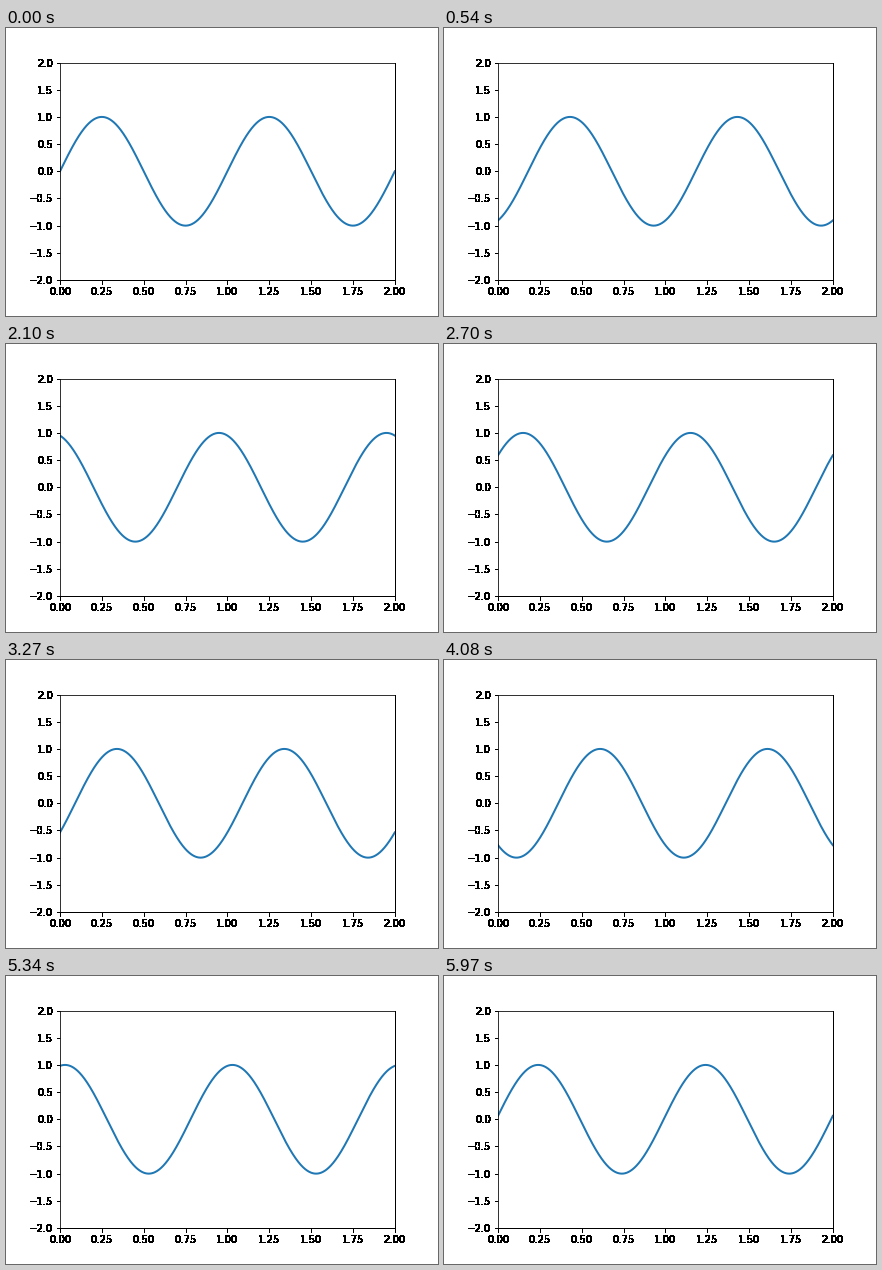
A matplotlib script that plays this animation: 432 by 288 pixels, repeating every 6 s.

```python
import numpy as np
import matplotlib.pyplot as plt
from matplotlib.animation import FuncAnimation

FRAMES = 200
INTERVAL = 30

fig, ax = plt.subplots(figsize=(6, 4), dpi=72, facecolor=(1, 1, 1, 0))
fig.subplots_adjust(left=0.125, right=0.9, bottom=0.125, top=0.88)
ax.set_xlim(0, 2)
ax.set_ylim(-2, 2)

# Dropping the alpha of a transparent render gives labels and ticks hard, heavy edges.
fig.canvas.draw()
backdrop = np.array(fig.canvas.buffer_rgba())[..., :3].copy()
fig.set_facecolor("white")
fig.figimage(backdrop, origin="upper", zorder=-1)

x = np.linspace(0, 2, 1000)
line, = ax.plot(x, np.sin(2 * np.pi * x), lw=2)


def update(i):
    line.set_ydata(np.sin(2 * np.pi * (x - 0.01 * i)))
    return (line,)


anim = FuncAnimation(fig, update, frames=FRAMES, interval=INTERVAL,
                     repeat=True, repeat_delay=0)
plt.show()
```
